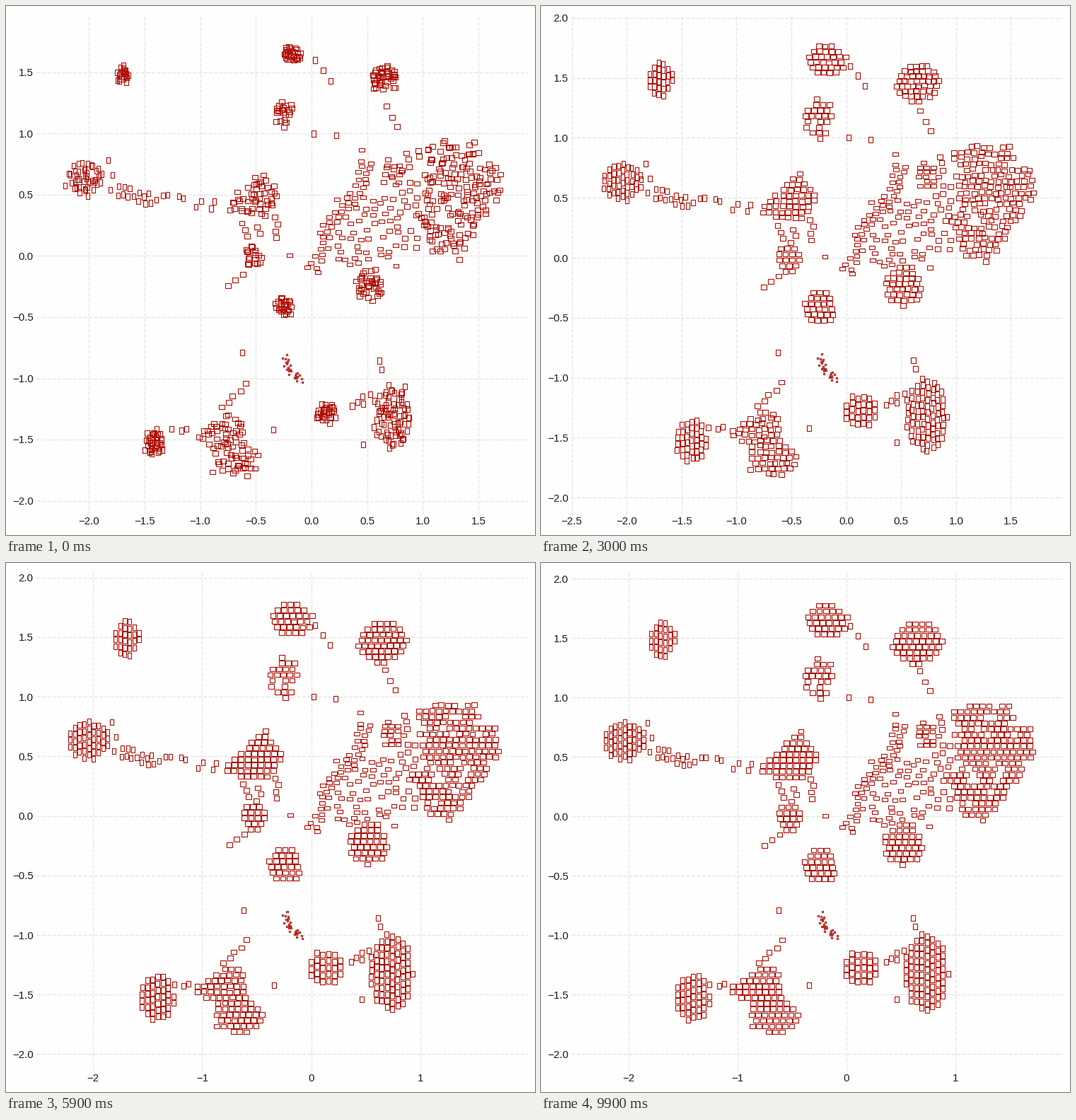
Recreate the animation shown at these times as a matplotlib script. Size 748x748 px, loop 10 s.

```python
import numpy as np
import matplotlib.pyplot as plt
from matplotlib.animation import FuncAnimation
from matplotlib.collections import PolyCollection
from matplotlib.path import Path

SIZE, DPI = 748, 100
FRAMES, INTERVAL = 100, 100
LEFT, RIGHT, TOP, BOTTOM = 42.5, 737.5, 12.3, 718.5
RED, GRID, INK, PAPER = "#b01208", "#e5e5e5", "#1c1c1c", "#fefefe"
GAP = 1.5
WIDE, FLAT, TALL, SLIM = (7.8, 6.6), (7.8, 5), (6, 8), (5.2, 8)

plt.rcParams["font.family"] = "Liberation Sans"
rng = np.random.default_rng(11)

# The settled layout, in stage pixels (y down).
start, end, sizes, taus = [], [], [], []


def is_free(p, size, gap):
    if not end:
        return True
    reach = (np.array(sizes) + size) / 2 + gap
    return not (np.abs(np.array(end) - p) < reach).all(axis=1).any()


def place(p, size, first=None, tau=1.0, gap=0.8):
    if not is_free(p, size, gap):
        return False
    end.append(p)
    start.append(p if first is None else first)
    sizes.append(size)
    taus.append(tau)
    return True


def patch(outline, size=WIDE, shrink=0.5, jitter=2.5, keep=1.0):
    """Pack an outline with boxes that start out crowded together."""
    shape = Path(outline)
    lo, hi = np.min(outline, axis=0), np.max(outline, axis=0)
    step = np.array(size) + GAP
    run = int(size[1] > size[0])  # tall boxes stack in columns
    cross = 1 - run
    spots = []
    for c in np.arange(lo[cross] + step[cross] / 2, hi[cross], step[cross]):
        offset = rng.uniform(0, step[run])
        for r in np.arange(lo[run] + offset, hi[run], step[run]):
            p = np.empty(2)
            p[cross], p[run] = c, r
            if shape.contains_point(p) and rng.random() < keep:
                spots.append(p)
    mid = np.mean(spots, axis=0)
    tau = min(0.5 * len(spots), 24)
    for p in spots:
        first = mid + (p - mid) * shrink + rng.normal(0, jitter, 2)
        place(p, size, first, tau)


def blob(cx, cy, rx, ry, size=WIDE, shrink=0.5, **kw):
    a = np.linspace(0, 2 * np.pi, 40)
    patch(np.column_stack([cx + rx * np.cos(a), cy + ry * np.sin(a)]),
          size, shrink, **kw)


def strip(path, n, spread, size, gap=0.8):
    """Boxes strewn along a polyline without touching."""
    path = np.array(path, float)
    dist = np.r_[0, np.cumsum(np.hypot(*np.diff(path, axis=0).T))]
    for at in np.linspace(0, dist[-1], n):
        mid = np.array([np.interp(at, dist, path[:, k]) for k in (0, 1)])
        for _ in range(30):
            if place(mid + rng.uniform(-spread, spread, 2), size, gap=gap):
                break


def scatter(x0, x1, y0, y1, n, size):
    for _ in range(n):
        for _ in range(30):
            if place(rng.uniform((x0, y0), (x1, y1)), size, gap=1.5):
                break


# top row
blob(171, 107, 19, 27, SLIM, 0.4)
blob(403, 81, 32, 25, shrink=0.42)
blob(532, 113, 36, 31)
blob(393, 162, 20, 31, shrink=0.6, keep=0.8)
strip([(437, 90), (459, 117)], 5, 1, TALL)
strip([(536, 153), (551, 181)], 3, 1, WIDE)
strip([(405, 190), (445, 191), (467, 193)], 3, 1, TALL)

# left side
blob(118, 252, 30, 28, SLIM, 0.8)
patch([(309, 285), (340, 263), (352, 247), (364, 234), (380, 252),
       (394, 278), (376, 303), (350, 308), (312, 300)], shrink=0.85)
blob(352, 358, 18, 25, shrink=0.65, keep=0.85)
blob(394, 428, 25, 26, shrink=0.42)
strip([(151, 226), (156, 248), (153, 268)], 3, 1, SLIM)
strip([(160, 270), (205, 279)], 15, 8, SLIM)
strip([(212, 277), (255, 284), (300, 287)], 9, 7, SLIM)
strip([(317, 400), (338, 384)], 3, 1, WIDE)
scatter(334, 386, 305, 336, 9, WIDE)
strip([(394, 496), (400, 512), (416, 529)], 26, 4.5, (2, 2), gap=0)

# bottom row
blob(214, 614, 25, 33, TALL, 0.5)
patch([(263, 603), (290, 585), (308, 570), (333, 573), (341, 600),
       (347, 618), (368, 635), (355, 660), (325, 669), (298, 655),
       (291, 622)], shrink=0.85, jitter=3.5)
blob(453, 571, 26, 24, (6.8, 8), 0.55)
blob(544, 578, 32, 56, TALL, 0.78, jitter=3)
strip([(490, 560), (512, 555)], 13, 9, TALL)
strip([(340, 535), (308, 565)], 5, 3, WIDE)
strip([(234, 597), (290, 601)], 9, 4, TALL)
strip([(526, 502), (533, 496), (529, 514)], 3, 0, TALL)
strip([(336, 491), (360, 594), (503, 617)], 3, 0, TALL)

# ring on the right
patch([(583, 206), (612, 198), (664, 202), (670, 230), (695, 235),
       (696, 270), (680, 298), (660, 322), (645, 350), (630, 367),
       (588, 355), (587, 322), (564, 312), (568, 297), (592, 290),
       (584, 250)], shrink=0.96, jitter=4, keep=0.9)

# centre
blob(512, 397, 28, 31, shrink=0.65)
blob(545, 242, 18, 20, FLAT, 0.9, keep=0.85)
strip([(432, 376), (442, 360), (455, 315), (478, 295), (500, 265),
       (508, 236)], 58, 8, FLAT)
scatter(466, 552, 275, 376, 45, FLAT)
scatter(552, 583, 208, 350, 18, WIDE)
strip([(402, 357), (501, 213)], 2, 0, FLAT)

start, end, sizes = map(np.array, (start, end, sizes))
taus = np.array(taus)[:, None]


def ease(i, a, b, tau):
    """Decay from a at the first frame to b at the last."""
    last = FRAMES - 1
    return a + (b - a) * (1 - np.exp(-i / tau)) / (1 - np.exp(-last / tau))


def scale(i):
    """Stage pixels of x = -2, x = 1, y = 2 and y = -2."""
    return (ease(i, 117.3, 124, 40), ease(i, 589.3, 585.9, 25),
            ease(i, 7.5, 22.3, 32), ease(i, 699.5, 694.4, 15))


def to_data(x, y, i):
    x0, x1, y1, y0 = scale(i)
    return -2 + (x - x0) * 3 / (x1 - x0), -2 + (y0 - y) * 4 / (y0 - y1)


CORNERS = np.array([(-1, -1), (1, -1), (1, 1), (-1, 1)]) / 2

fig = plt.figure(figsize=(SIZE / DPI, SIZE / DPI), dpi=DPI, facecolor=PAPER)
ax = fig.add_axes([LEFT / SIZE, 1 - BOTTOM / SIZE,
                   (RIGHT - LEFT) / SIZE, (BOTTOM - TOP) / SIZE],
                  facecolor="none")
for spine in ax.spines.values():
    spine.set_visible(False)
ax.set_axisbelow(True)
ax.grid(color=GRID, linestyle="--", linewidth=1)
ax.tick_params(length=0, labelsize=10.8, labelcolor=INK, pad=2.8)
rects = PolyCollection([], facecolors="none", edgecolors=RED, linewidths=0.82)
ax.add_collection(rects, autolim=False)


def draw(i):
    pos = ease(i, start, end, taus)
    quads = pos[:, None] + sizes[:, None] * CORNERS
    quads = to_data(quads[..., 0], quads[..., 1], FRAMES - 1)
    rects.set_verts(np.stack(quads, axis=-1))
    left, bottom = to_data(LEFT, BOTTOM, i)
    right, top = to_data(RIGHT, TOP, i)
    ax.set_xlim(left, right)
    ax.set_ylim(bottom, top)
    return [rects]


anim = FuncAnimation(fig, draw, frames=FRAMES, interval=INTERVAL,
                     repeat=True, repeat_delay=0, blit=False)
plt.show()
```
